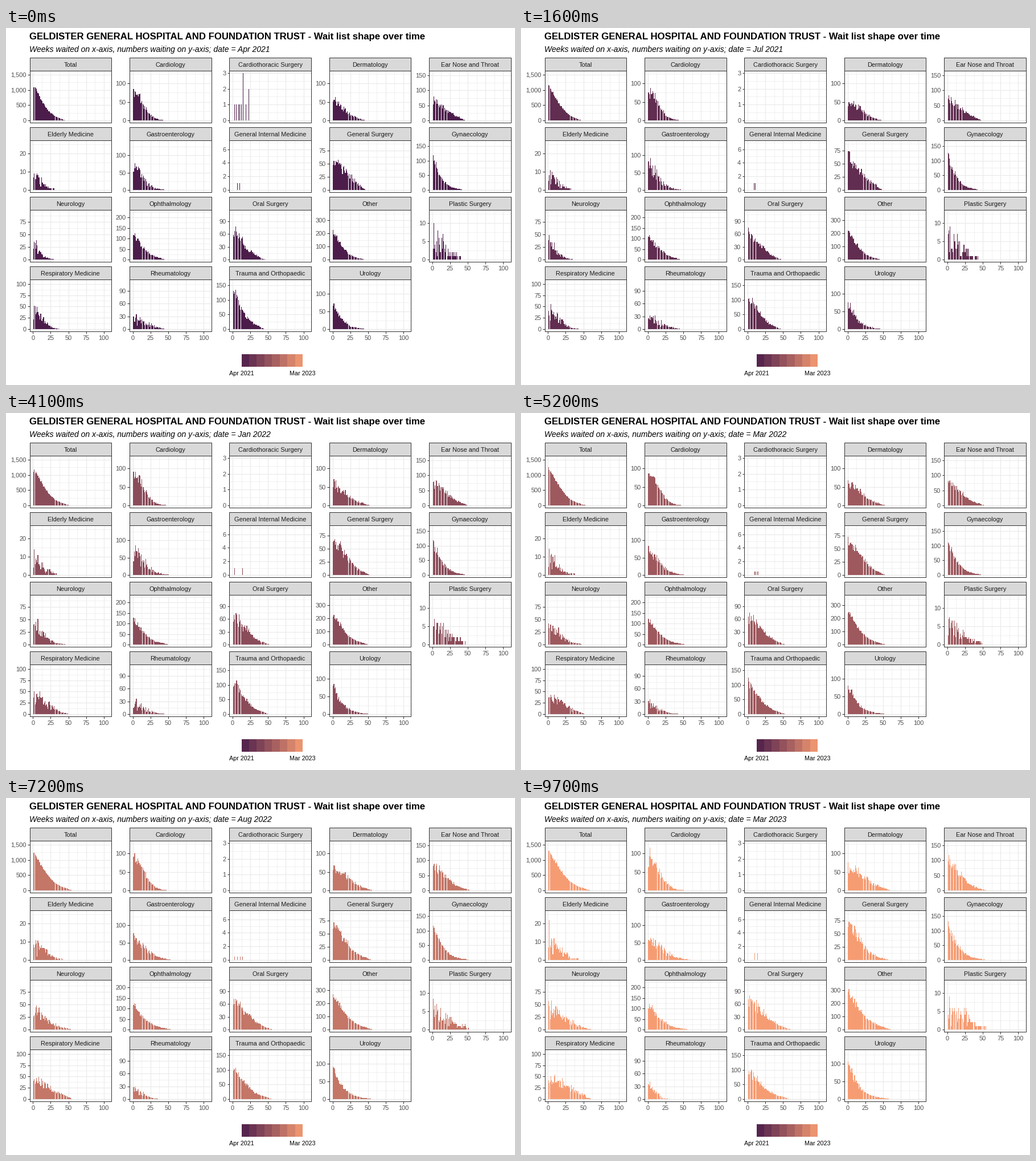
Write a matplotlib script that moves like this. It is 894 by 626 pixels and loops after 10 s.

```python
import numpy as np
import matplotlib.pyplot as plt
from matplotlib.animation import FuncAnimation
from matplotlib.collections import LineCollection, PolyCollection
from matplotlib.patches import Rectangle

W, H, DPI = 894, 626, 100
FRAMES, INTERVAL, MONTHS = 100, 100, 24
TITLE = "GELDISTER GENERAL HOSPITAL AND FOUNDATION TRUST - Wait list shape over time"
SUBTITLE = "Weeks waited on x-axis, numbers waiting on y-axis; date = "
NAMES = "Jan Feb Mar Apr May Jun Jul Aug Sep Oct Nov Dec".split()
DATES = [f"{NAMES[m % 12]} {2021 + m // 12}" for m in range(3, 3 + MONTHS)]
SWITCHES = np.array([5, 10, 15, *range(20, 97, 4)])

# Panel geometry in pixels
LEFT, TOP, PITCH_X, PITCH_Y = 41.5, 74.6, 175.4, 122
PANEL_W, PANEL_H, STRIP_H = 143.6, 91.6, 22.4
WEEK, ORIGIN_X, ORIGIN_Y = 1.2445, 5.84, PANEL_H / 22
RANGE_Y = PANEL_H / 1.1

weeks = np.arange(1, 106)
rng = np.random.default_rng(7)

plt.rcParams["font.family"] = "Liberation Sans"
fig = plt.figure(figsize=(W / DPI, H / DPI), dpi=DPI, facecolor="white")
ax = fig.add_axes([0, 0, 1, 1])
ax.set(xlim=(0, W), ylim=(H, 0))
ax.axis("off")


def ramp(p):
    stops = [(76, 29, 75), (157, 89, 94), (246, 156, 115)]
    return [np.interp(p, [0, .5, 1], c) / 255 for c in zip(*stops)]


def label(x, y, text, px=11, color="#4d4d4d", ha="center", **kw):
    return ax.text(x, y, text, fontsize=px * 72 / DPI, color=color, ha=ha,
                   va="baseline", zorder=5, **kw)


def queue(peak, scale, bend, rough):
    """Patients still waiting after w weeks: peak * exp(-(w / scale) ** bend).

    Peak and scale drift from the first month to the last. Part of the noise
    belongs to the week of referral, so bumps age along the axis.
    """
    cohorts = rng.uniform(-1, 1, 220)
    counts = np.zeros((MONTHS, len(weeks)))
    for m in range(MONTHS):
        p = m / (MONTHS - 1)
        height, span = (a + (b - a) * p for a, b in (peak, scale))
        cutoff = np.clip((48 + 14 * p - weeks) / 10, 0, 1)
        arrival = (4.35 * m - weeks).astype(int) + 110
        noise = cohorts[arrival] + rng.uniform(-1, 1, len(weeks))
        mean = height * np.exp(-(weeks / span) ** bend) * cutoff
        counts[m] = np.round(mean * np.clip(1 + .65 * rough * noise, 0, None))
    return counts


def lone_cases():
    """One or two single patients a month."""
    counts = np.zeros((MONTHS, len(weeks)))
    for month in counts:
        month[rng.integers(0, 15, 2)] = 1
    return counts


def short_list():
    """A few patients in the first month only."""
    counts = np.zeros((MONTHS, len(weeks)))
    counts[0, [2, 4, 7, 9, 11, 18]] = 1
    counts[0, [14, 22]] = 3, 2
    return counts


# Name, highest count, label step, counts
panels = [
    ("Cardiology", 128, 50, queue((75, 90), (20, 22), 2, .25)),
    ("Cardiothoracic Surgery", 3, 1, short_list()),
    ("Dermatology", 128, 50, queue((50, 65), (24, 32), 1.8, .3)),
    ("Ear Nose and Throat", 158, 50, queue((65, 95), (27, 25), 1.7, .25)),
    ("Elderly Medicine", 26, 10, queue((7, 13), (17, 20), 1.6, .7)),
    ("Gastroenterology", 137, 50, queue((75, 70), (17, 24), 1.5, .45)),
    ("General Internal Medicine", 7, 2, lone_cases()),
    ("General Surgery", 90, 25, queue((60, 72), (27, 24), 1.6, .25)),
    ("Gynaecology", 162, 50, queue((115, 125), (13, 16), 1.2, .2)),
    ("Neurology", 95, 25, queue((35, 45), (12, 30), 1.6, .5)),
    ("Ophthalmology", 225, 50, queue((120, 120), (18, 20), 1.3, .2)),
    ("Oral Surgery", 111, 30, queue((60, 68), (24, 31), 1.8, .3)),
    ("Other", 363, 100, queue((220, 290), (16, 24), 1.3, .15)),
    ("Plastic Surgery", 13, 5, queue((5, 5.5), (25, 32), 1.5, 1)),
    ("Respiratory Medicine", 105, 25, queue((38, 42), (18, 42), 2, .4)),
    ("Rheumatology", 111, 30, queue((24, 26), (26, 14), 1.8, .6)),
    ("Trauma and Orthopaedic", 163, 50, queue((125, 100), (19, 25), 1.4, .2)),
    ("Urology", 134, 50, queue((75, 100), (13, 16), 1.1, .25)),
]
panels.insert(0, ("Total", 1560, 500, sum(p[3] for p in panels)))

major, minor, ticks = [], [], []
bar_x, bar_y, bar_h = [], [], []

for i, (name, top, step, counts) in enumerate(panels):
    row, col = divmod(i, 5)
    x0, y0 = LEFT + PITCH_X * col, TOP + PITCH_Y * row
    x1, y1 = x0 + PANEL_W, y0 + PANEL_H
    zero_x, zero_y, scale = x0 + ORIGIN_X, y1 - ORIGIN_Y, RANGE_Y / top

    for k in range(9):
        x = zero_x + 12.5 * k * WEEK
        (minor if k % 2 else major).append([(x, y0), (x, y1)])
        if k % 2 == 0 and i >= 14:
            ticks.append([(x, y1), (x, y1 + 3.5)])
            label(x, y1 + 15.2, f"{12.5 * k:.0f}")
    k = 0
    while (y := zero_y - k * step / 2 * scale) > y0:
        (minor if k % 2 else major).append([(x0, y), (x1, y)])
        if k % 2 == 0:
            ticks.append([(x0 - 3.5, y), (x0, y)])
            label(x0 - 6, y + 4, f"{k * step // 2:,}", ha="right")
        k += 1

    for y, height, fill in ((y0 - STRIP_H, STRIP_H, "#d9d9d9"), (y0, PANEL_H, "none")):
        ax.add_patch(Rectangle((x0, y), PANEL_W, height, zorder=4,
                               fc=fill, ec="#333333", lw=.72))
    label(x0 + PANEL_W / 2, y0 - 7.1, name, color="#1a1a1a")

    bar_x.append(zero_x + weeks * WEEK)
    bar_y.append(np.full(len(weeks), zero_y))
    bar_h.append(np.clip(counts, 0, top) * scale)

bar_x, bar_y = np.concatenate(bar_x), np.concatenate(bar_y)
bar_h = np.concatenate(bar_h, axis=1)

for lines, color, px, z in ((minor, "#ebebeb", .67, 1), (major, "#ebebeb", 1.2, 1),
                            (ticks, "#333333", 1, 4)):
    ax.add_collection(LineCollection(lines, colors=color, linewidths=px * .72, zorder=z))

label(41, 20.3, TITLE, 16.7, "black", "left", weight="bold")
subtitle = label(41, 42, "", 13.96, "black", "left", style="italic")

for k in range(8):
    ax.add_patch(Rectangle((413.5 + 13.45 * k, 572), 13.45, 22, lw=0,
                           fc=ramp((k + .5) / 8)))
label(413.5, 609, DATES[0], 10.7, "black")
label(521, 609, DATES[-1], 10.7, "black")

bars = PolyCollection([], linewidths=0, zorder=3)
ax.add_collection(bars)


def update(frame):
    # Each switch passes through one halfway step
    pos = ((frame >= SWITCHES).sum() + (frame > SWITCHES).sum()) / 2
    month = int(pos)
    height = (bar_h[month] + bar_h[int(np.ceil(pos))]) / 2
    on = height > 0
    x, y, h, half = bar_x[on], bar_y[on], height[on], .45 * WEEK
    xs = np.stack([x - half, x + half, x + half, x - half], axis=1)
    ys = np.stack([y, y, y - h, y - h], axis=1)
    # Whole pixels keep the bar edges and the gaps between them sharp
    bars.set_verts(np.round(np.stack([xs, ys], axis=2)))
    bars.set_facecolor(ramp(pos / (MONTHS - 1)))
    subtitle.set_text(SUBTITLE + DATES[month])
    return bars, subtitle


anim = FuncAnimation(fig, update, frames=FRAMES, interval=INTERVAL, repeat=True)
plt.show()
```
